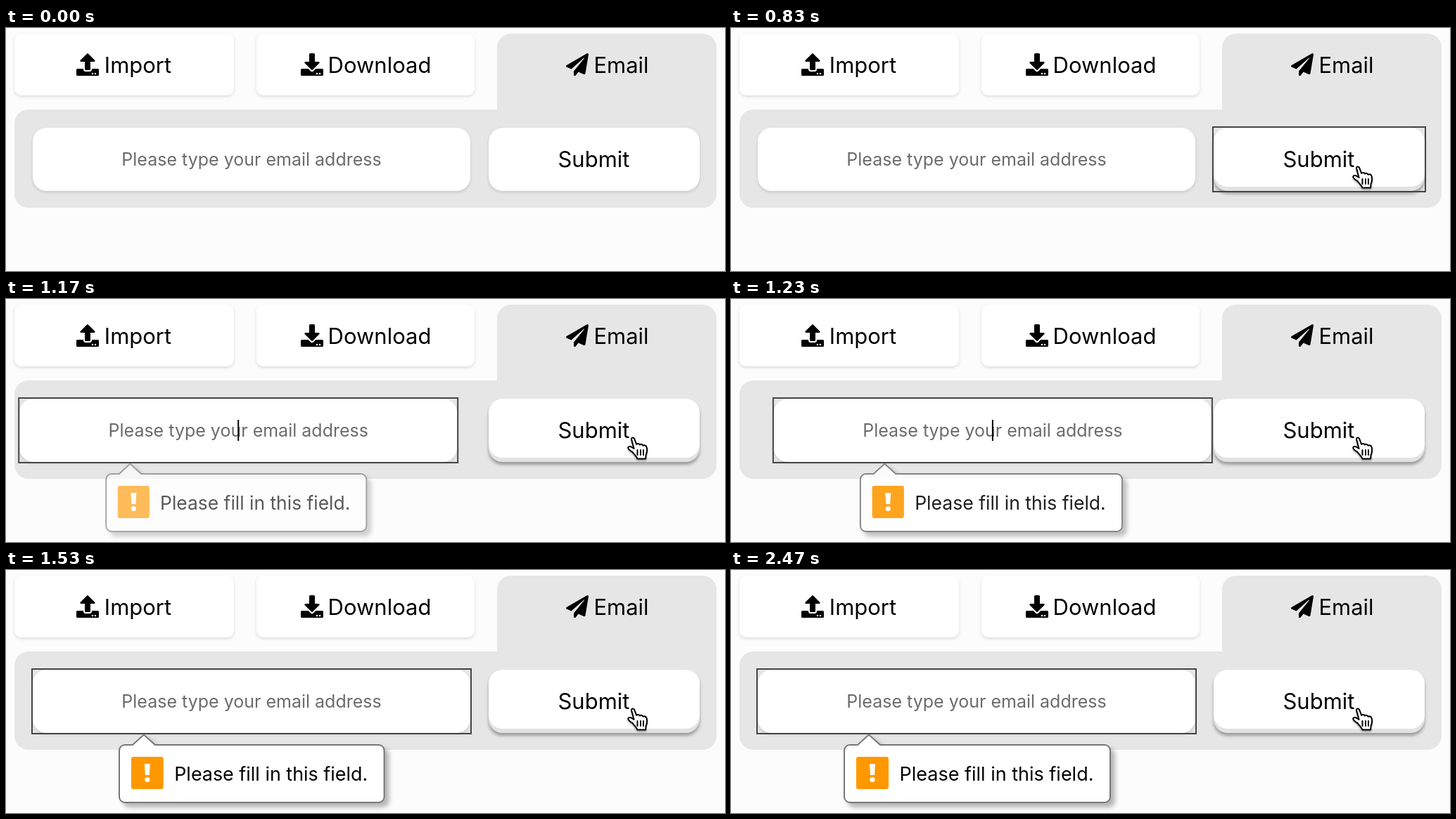
Animation of 1022 by 346 pixels, one loop 2510 ms. Source, as an HTML page:

```html
<!DOCTYPE html>
<html lang="en">
<head>
<meta charset="utf-8">
<title>Email form</title>
<style>
  html, body { margin: 0; width: 100%; height: 100%; overflow: hidden; background: #fcfcfc; }
  svg { display: block; width: 100vw; height: 100vh; }
  text { font-family: Inter, Roboto, sans-serif; font-size: 31px; text-anchor: middle; }
  .card { fill: #fff; filter: drop-shadow(0 2px 2px rgba(0, 0, 0, .13)); }
  .ring { fill: none; stroke: #444; stroke-width: 2; }
  .hint { font-size: 25px; fill: #6b6b6b; }
  .message { font-size: 27px; text-anchor: start; }
  .bubble { fill: #fff; stroke: #777; stroke-width: 2; filter: drop-shadow(6px 6px 3px rgba(0, 0, 0, .28)); }
  .pointer { fill: #fff; stroke: #000; stroke-width: 2; stroke-linejoin: round; stroke-linecap: round;
             filter: drop-shadow(0 2px 1px rgba(0, 0, 0, .3)); }
</style>
</head>
<body>
<svg viewBox="0 0 1022 346">
  <rect class="card" x="12" y="8" width="312" height="88" rx="10"/>
  <rect class="card" x="356" y="8" width="310" height="88" rx="10"/>
  <path fill="#e6e6e6" d="M32 116H698V28a20 20 0 0 1 20-20H990a20 20 0 0 1 20 20V236a20 20 0 0 1-20 20H32a20 20 0 0 1-20-20V136a20 20 0 0 1 20-20z"/>

  <g transform="translate(100 36)">
    <path d="M13.5 24a1.5 1.5 0 0 1-1.5-1.5V12H6.5a1.3 1.3 0 0 1-.9-2.1L15.1.4a1.2 1.2 0 0 1 1.7 0l9.5 9.5a1.3 1.3 0 0 1-.9 2.1H20v10.5a1.5 1.5 0 0 1-1.5 1.5z"/>
    <path d="M32 23.5v7a1.5 1.5 0 0 1-1.5 1.5h-29A1.5 1.5 0 0 1 0 30.5v-7A1.5 1.5 0 0 1 1.5 22H10v.5a3.5 3.5 0 0 0 3.5 3.5h5a3.5 3.5 0 0 0 3.5-3.5V22h8.5a1.5 1.5 0 0 1 1.5 1.5z"/>
    <path fill="none" stroke="#fff" stroke-width="2.5" stroke-linecap="round" d="M23 29h0M27 29h0"/>
  </g>
  <g transform="translate(419 36)">
    <path d="M13.5 0h5A1.5 1.5 0 0 1 20 1.5V12h5.5a1.3 1.3 0 0 1 .9 2.1l-9.5 9.5a1.2 1.2 0 0 1-1.7 0L5.6 14.1A1.3 1.3 0 0 1 6.5 12H12V1.5A1.5 1.5 0 0 1 13.5 0z"/>
    <path d="M32 23.5v7a1.5 1.5 0 0 1-1.5 1.5h-29A1.5 1.5 0 0 1 0 30.5v-7A1.5 1.5 0 0 1 1.5 22h9.2l3 3a3.2 3.2 0 0 0 4.6 0l3-3h9.2a1.5 1.5 0 0 1 1.5 1.5z"/>
    <path fill="none" stroke="#fff" stroke-width="2.5" stroke-linecap="round" d="M23 29h0M27 29h0"/>
  </g>
  <path transform="translate(796 36)" d="M29.7.2L.8 16.9c-1.1.7-1 2.2.1 2.7l6.6 2.8L25.5 6.6c.4-.3.8.1.6.5L11 25.4v5c0 1.5 1.8 2.1 2.7 1l3.9-4.8 7.8 3.3c.9.4 1.9-.2 2.1-1.1l4.5-27C32.2.5 30.8-.4 29.7.2z"/>
  <text x="187.5" y="64">Import</text>
  <text x="531" y="64">Download</text>
  <text x="874.5" y="64">Email</text>

  <rect id="edge" x="686" y="142" width="300" height="90" rx="20"/>
  <rect id="face" x="686" y="142" width="300" height="90" rx="20" fill="#fff"/>
  <text x="835.5" y="198">Submit</text>
  <rect id="buttonRing" class="ring" x="685" y="141" width="302" height="92"/>

  <g id="field">
    <rect class="card" x="38" y="142" width="622" height="90" rx="20"/>
    <text class="hint" x="349" y="196">Please type your email address</text>
    <path id="caret" stroke="#000" stroke-width="2" d="M349 172V202"/>
    <rect id="fieldRing" class="ring" x="37" y="141" width="624" height="92"/>
  </g>

  <g id="popup">
    <path class="bubble" d="M8 249H19L35 234.5 51 249H370a8 8 0 0 1 8 8V323a8 8 0 0 1-8 8H8a8 8 0 0 1-8-8V257a8 8 0 0 1 8-8z"/>
    <rect x="17" y="266" width="46" height="46" rx="3" fill="#ff9800"/>
    <path fill="#fff" d="M36 276h8l-1 16h-6z"/>
    <circle cx="40" cy="298.5" r="3.6" fill="#fff"/>
    <text class="message" x="78.5" y="300">Please fill in this field.</text>
  </g>

  <g id="cursor" class="pointer">
    <path id="arrow" d="M8 1V26L14 20.5 18 30 22.5 28 18.5 19H26.5z"/>
    <g id="hand">
      <path d="M6.2 4.2C5.4 1.2 9 .4 10.2 3.2L13.2 11C14.5 9.3 17.3 9.6 18 11.6 19.5 10.2 22 10.8 22.6 12.8 24.4 11.8 27 12.4 27.6 15 29 20 28 23 26.6 26L26.2 31.5H14.5C13.5 28.5 10 25 7 21.5 4.5 20.5 1.5 17.5 1.2 15.8 1.6 13.6 4.8 13.4 6.5 15L9.6 17z"/>
      <path d="M14.5 19V26M19 19V26M23 19V26"/>
    </g>
  </g>
</svg>
<script>
  const LOOP = 2510, ENTER = 100, HOVER = 160, CLICK = 830, FOCUS = 930;
  const SHAKE_START = 950, SHAKE_PEAK = 1070, SHAKE_END = 1430;
  const $ = id => document.getElementById(id);
  const ramp = (t, from, to) => Math.min(1, Math.max(0, (t - from) / (to - from)));
  const mix = (a, b, k) => a + (b - a) * k;
  const show = (id, on) => $(id).style.display = on ? '' : 'none';
  const move = (id, value) => $(id).setAttribute('transform', value);

  function drawCursor(t) {
    const k = 1 - (1 - ramp(t, ENTER, 530)) ** 1.45;
    show('cursor', t >= ENTER);
    show('arrow', t < HOVER);
    show('hand', t >= HOVER);
    move('cursor', `translate(${mix(1008, 883, k)} ${mix(243, 196, k)})`);
  }

  function drawButton(t) {
    const k = ramp(t, HOVER, 460);
    const grey = mix(179, 226, ramp(k, .57, 1));
    const depth = Math.min(6, 7 * k);
    $('edge').setAttribute('fill', `rgb(${grey},${grey},${grey})`);
    $('edge').style.filter = `drop-shadow(0 ${mix(2, 4, k)}px 2px rgba(0,0,0,${mix(.13, .32, k)}))`;
    $('face').setAttribute('height', 90 - depth);
    show('buttonRing', t >= CLICK && t < FOCUS);
  }

  // Damped sideways swing of the invalid field
  function shake(t) {
    if (t < SHAKE_START || t > SHAKE_END) return 0;
    const d = t - SHAKE_PEAK;
    return 38 * Math.exp(-d / 318) * Math.cos(2 * Math.PI * d / 160);
  }

  function drawField(t) {
    const dx = shake(t);
    const stretch = 1 - .034 * Math.exp(-(t - SHAKE_PEAK) / 207);
    move('field', `translate(${dx} 0)`);
    show('fieldRing', t >= FOCUS);
    show('caret', t >= FOCUS && (t - FOCUS) % 1000 < 500);
    move('popup', `translate(${161 + dx} 0) scale(${stretch} 1)`);
    $('popup').style.opacity = ramp(t, 1005, 1263);
  }

  function draw() {
    const t = performance.now() % LOOP;
    drawCursor(t);
    drawButton(t);
    drawField(t);
    requestAnimationFrame(draw);
  }
  draw();
</script>
</body>
</html>
```
